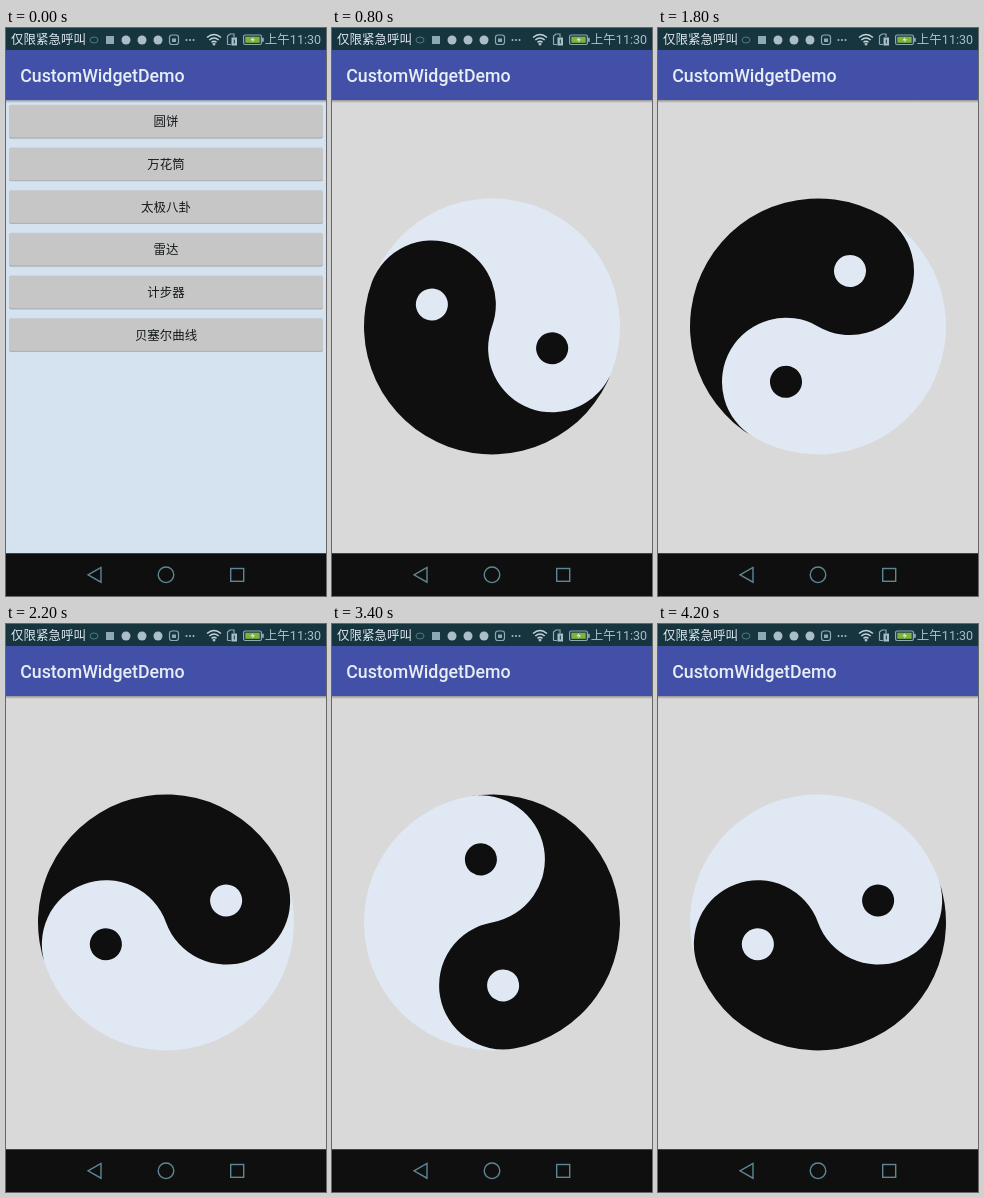
Animation, 320 px wide and 568 px high, one loop 4.4 s. Source, as an HTML page:

```html
<!DOCTYPE html>
<html lang="zh-CN">
<head>
<meta charset="utf-8">
<title>CustomWidgetDemo</title>
<style>
  html, body { margin: 0; width: 100%; height: 100%; overflow: hidden; background: #0f0f0f; }
  svg { display: block; }
  text { font-family: Roboto, "Noto Sans CJK SC", "Noto Sans CJK", sans-serif; }
  .status text { font-size: 12.5px; }
  .line { fill: none; stroke: #8fa9b2; stroke-width: 1.2; }
  .nav { fill: none; stroke: #5d8794; stroke-width: 1.4; }
  #list text { font-size: 12.45px; font-weight: 500; text-anchor: middle; fill: #14191b; }
</style>
</head>
<body>
<svg width="320" height="568" viewBox="0 0 320 568">
  <defs>
    <linearGradient id="shade" x2="0" y2="1">
      <stop offset="0" stop-color="#000" stop-opacity=".32"/>
      <stop offset="1" stop-color="#000" stop-opacity="0"/>
    </linearGradient>
  </defs>

  <rect id="page" y="72" width="320" height="453.5"/>
  <g id="list"></g>
  <g id="disc">
    <circle r="128" fill="#e0e9f3"/>
    <path d="M-128 0A128 128 0 0 1 128 0A64 64 0 0 1 0 0A64 64 0 0 0 -128 0Z" fill="#0f0f0f"/>
    <circle cx="64" r="16" fill="#e0e9f3"/>
    <circle cx="-64" r="16" fill="#0f0f0f"/>
  </g>

  <rect y="72" width="320" height="3" fill="url(#shade)"/>
  <rect y="22" width="320" height="50" fill="#4350a8"/>
  <text x="14.2" y="54" font-size="17.8" font-weight="500" fill="#e6eef5">CustomWidgetDemo</text>

  <g class="status">
    <rect width="320" height="22" fill="#17353f"/>
    <text x="5" y="16" fill="#dfe9f0">仅限紧急呼叫</text>
    <text x="315" y="16" text-anchor="end" fill="#a9bec6">上午11:30</text>
    <ellipse cx="88" cy="12" rx="4" ry="3" fill="none" stroke="#4d7a80"/>
    <rect x="100" y="8" width="8" height="8" fill="#8fa9b2"/>
    <g fill="#a9bec6">
      <circle cx="120" cy="12" r="4.5"/>
      <circle cx="136" cy="12" r="4.5"/>
      <circle cx="152" cy="12" r="4.5"/>
      <circle cx="180.5" cy="12" r="1"/>
      <circle cx="184" cy="12" r="1"/>
      <circle cx="187.500" cy="12" r="1"/>
      <circle cx="208" cy="16" r="1.5"/>
    </g>
    <rect class="line" x="163.500" y="7" width="9" height="9.500" rx="2.500"/>
    <rect x="166" y="10.500" width="4" height="3.500" fill="#8fa9b2"/>
    <path class="line" style="stroke: #c3d3da; stroke-width: 1.5"
      d="M201 9.500Q208 3.500 215 9.500M203.300 12Q208 8 212.700 12M205.500 14.300Q208 12.300 210.500 14.300"/>
    <path class="line" d="M221.500 16.500V8L224 6H228V9M221.500 16.500H225"/>
    <rect x="225.500" y="9.500" width="5.500" height="8" fill="#a9bec6"/>
    <path d="M228.300 11.500V15.500" stroke="#17353f"/>
    <rect class="line" x="237.600" y="7" width="17.800" height="9.500" rx="1.500"/>
    <rect x="239.300" y="8.700" width="14.400" height="6.100" fill="#7fb33d"/>
    <rect x="256" y="9.800" width="1.800" height="4" fill="#8fa9b2"/>
    <path d="M247.500 8.500L244.500 12.300H247L245.700 15L249 11.300H246.500Z" fill="#e6eef5"/>
  </g>

  <rect y="525.500" width="320" height="42.500" fill="#0f0f0f"/>
  <g class="nav">
    <path d="M82 546.800L95 539.500V554.200Z"/>
    <circle cx="160" cy="546.800" r="7.800"/>
    <rect x="224.700" y="540.500" width="13" height="12.800"/>
  </g>
</svg>
<script>
const LOOP = 4400, STEP = 200, OPEN_STEP = 3, LAG_STEP = 14;
const [page, list, disc] = ["page", "list", "disc"].map(id => document.getElementById(id));

list.innerHTML = ["圆饼", "万花筒", "太极八卦", "雷达", "计步器", "贝塞尔曲线"].map((label, i) => {
  const y = 77.2 + i * 42.67;
  return `<rect x="3" y="${y + 1}" width="314" height="32.500" rx="2" fill="#aeb4b8"/>
    <rect x="3" y="${y - 0.4}" width="314" height="32.500" rx="2" fill="#c6c6c6"/>
    <text x="160" y="${y + 21}">${label}</text>`;
}).join("");

// The disc turns 20° per step, with two half steps where the device lags.
function angleAt(step) {
  const lag = 10 * Math.min(2, Math.max(0, step - LAG_STEP + 1));
  return 180 + 20 * (step - OPEN_STEP) - lag;
}

function draw(now) {
  const step = Math.floor(now % LOOP / STEP);
  const open = step >= OPEN_STEP;
  page.setAttribute("fill", open ? "#d9d9d9" : "#d5e3f0");
  list.style.display = open ? "none" : "";
  disc.style.display = open ? "" : "none";
  disc.setAttribute("transform", `translate(160 298.400) rotate(${angleAt(step)})`);
  requestAnimationFrame(() => draw(performance.now()));
}
draw(performance.now());
</script>
</body>
</html>
```
